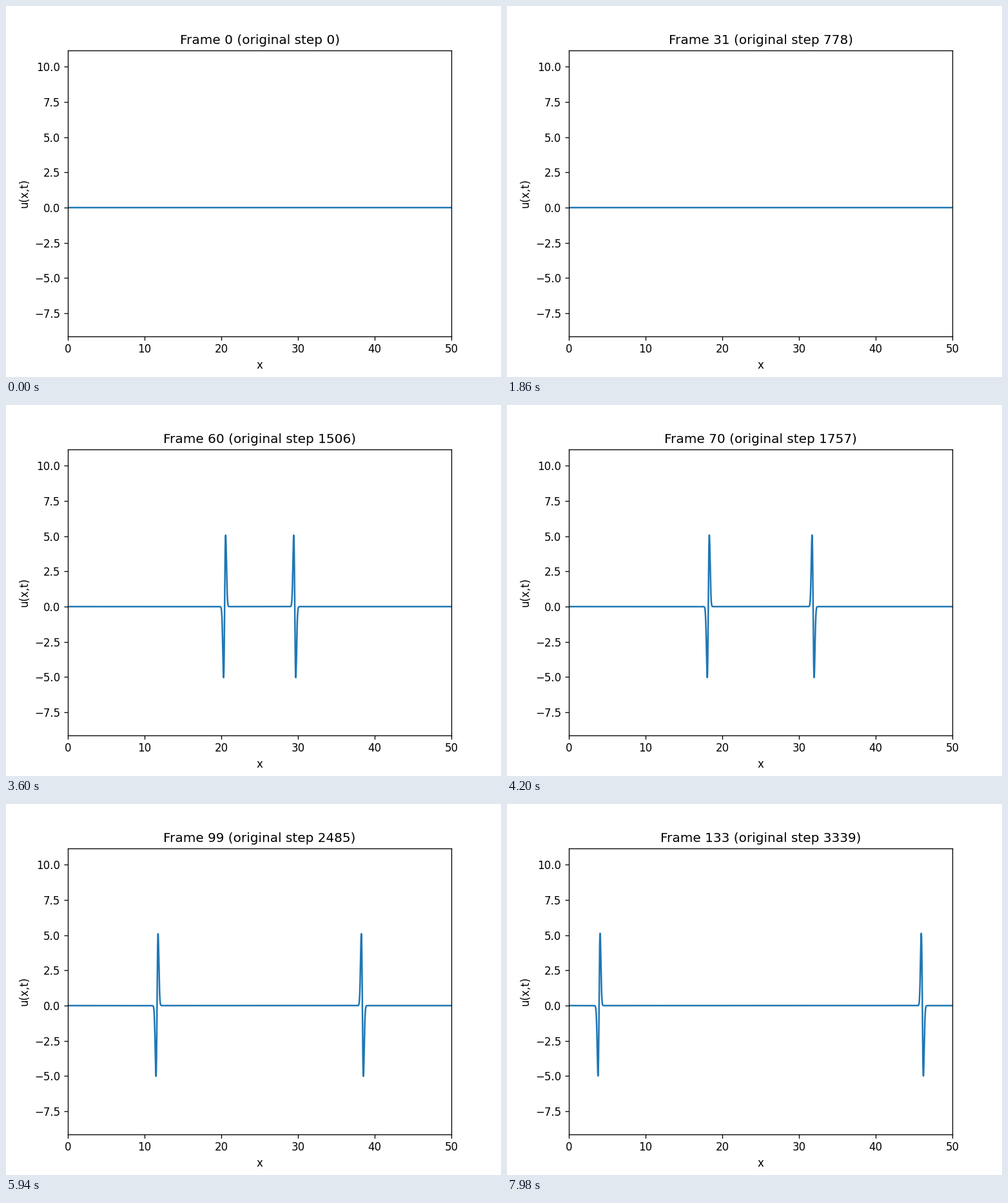
These frames come from a looping animation (768x576 px, 8000 ms). A matplotlib script:

```python
import numpy as np
import matplotlib.pyplot as plt
from matplotlib.animation import FuncAnimation

LENGTH, CELLS = 50.0, 5000
COURANT = 0.9          # wave speed * dt / dx
PULSE_STEP = 998       # time step at the middle of the pulse
PULSE_FREQ = 0.015     # cycles per time step
STRIDE = 25.1074       # time steps per shown picture
SHOWN = 134
TICK_MS, TICKS_PER_PICTURE, TICKS = 20, 3, 400
TITLE = "Frame {} (original step {})"


def ricker(n):
    a = (np.pi * PULSE_FREQ * (n - PULSE_STEP)) ** 2
    return (1 - 2 * a) * np.exp(-a)


def solve(steps):
    """Leapfrog wave equation, driven at the middle point."""
    wanted = set(steps)
    kept = {}
    prev = np.zeros(CELLS + 1)
    u = np.zeros(CELLS + 1)
    for n in range(max(steps) + 1):
        if n in wanted:
            kept[n] = u.copy()
        nxt = 2 * u - prev
        nxt[1:-1] += COURANT ** 2 * (u[2:] - 2 * u[1:-1] + u[:-2])
        nxt[CELLS // 2] += ricker(n)
        nxt[0] = nxt[-1] = 0
        prev, u = u, nxt
    return kept


steps = [int(i * STRIDE) for i in range(SHOWN)]
waves = solve(steps)
x = np.linspace(0, LENGTH, CELLS + 1)

plt.rcParams["font.family"] = "DejaVu Sans"
fig, ax = plt.subplots(figsize=(6.4, 4.8), dpi=120)
line, = ax.plot(x, waves[0], color="#1f77b4", lw=1.5)
ax.set_xlim(0, LENGTH)
ax.set_ylim(-9.135, 11.16)
ax.set_xlabel("x")
ax.set_ylabel("u(x,t)")
title = ax.set_title("")


def update(tick):
    i = min(tick // TICKS_PER_PICTURE, SHOWN - 1)
    line.set_ydata(waves[steps[i]])
    title.set_text(TITLE.format(i, steps[i]))
    return line, title


def init():
    return update(0)


anim = FuncAnimation(fig, update, frames=TICKS, init_func=init,
                     interval=TICK_MS, repeat=True, repeat_delay=0)
plt.show()
```
